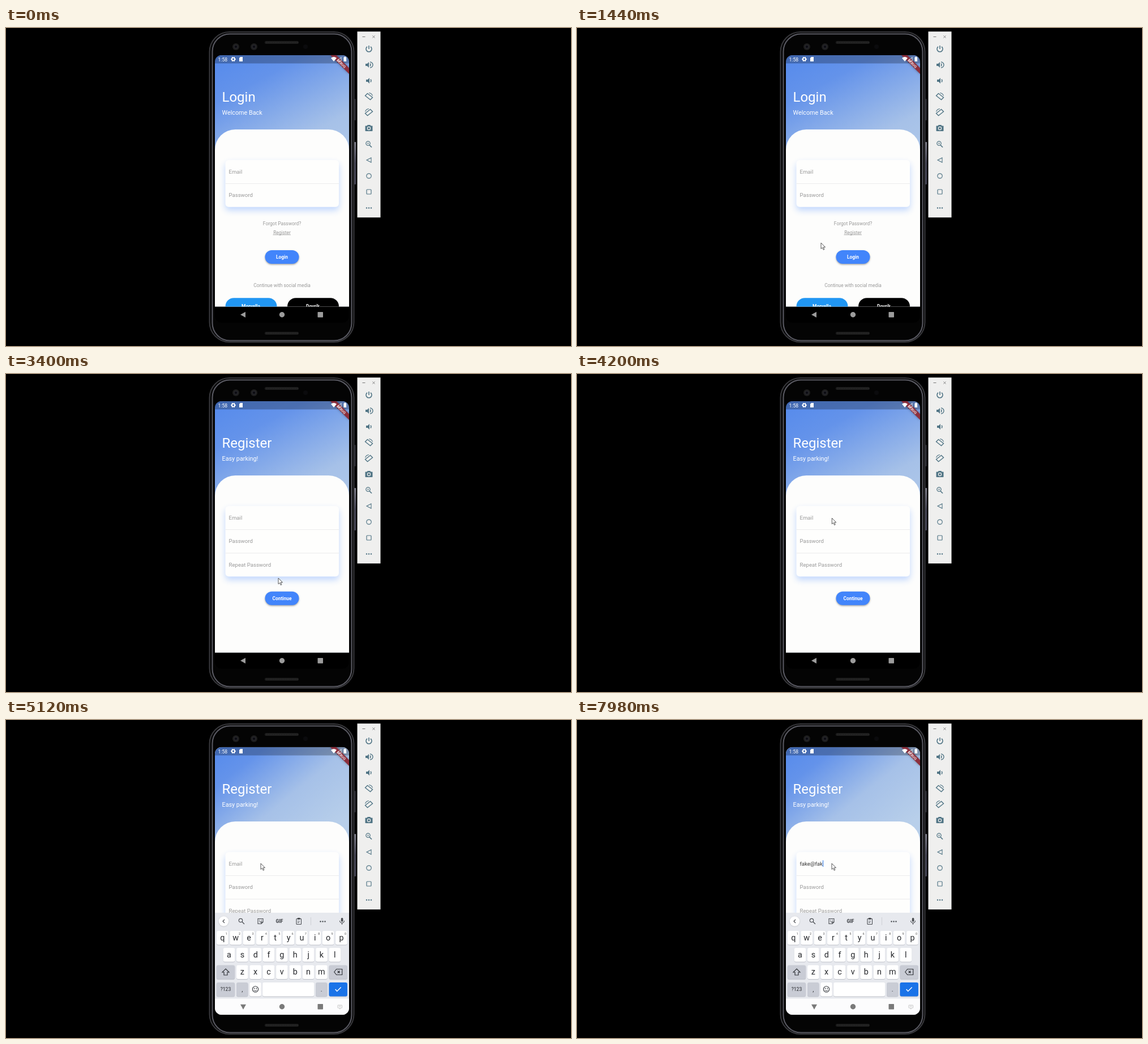
Write an HTML page with a canvas that moves like this. It is 998 by 561 pixels and loops after 8000 ms.

```html
<!DOCTYPE html>
<html>
<head>
<meta charset="utf-8">
<style>
html, body { margin: 0; height: 100%; overflow: hidden; background: #000; }
canvas { display: block; }
</style>
</head>
<body>
<canvas id="stage" width="998" height="561"></canvas>
<script>
const c = document.getElementById('stage').getContext('2d');
const LOOP = 8000, LEFT = 369, TOP = 47.7, WIDTH = 237, MID = 487.5;
const PAGE_END = 491.6, SCREEN_END = 520, KEYBOARD_TOP = 340;

const clamp = v => Math.max(0, Math.min(1, v));
const progress = (t, from, to) => clamp((t - from) / (to - from));
const easeOut = p => 1 - (1 - p) ** 3;
const smooth = p => p * p * (3 - 2 * p);

function box(x, y, w, h, r, fill, stroke, line = 1) {
  c.beginPath();
  c.roundRect(x, y, w, h, r);
  if (fill) { c.fillStyle = fill; c.fill(); }
  if (stroke) { c.strokeStyle = stroke; c.lineWidth = line; c.stroke(); }
}
function dot(x, y, r, fill, stroke, line) {
  box(x - r, y - r, 2 * r, 2 * r, r, fill, stroke, line);
}
function path(d, x, y, color, line) {
  c.save();
  c.translate(x, y);
  const shape = new Path2D(d);
  if (line) { c.strokeStyle = color; c.lineWidth = line; c.stroke(shape); }
  else { c.fillStyle = color; c.fill(shape); }
  c.restore();
}
function text(s, x, y, size, color, align = 'left', weight = 400) {
  c.font = `${weight} ${size}px Roboto, sans-serif`;
  c.textAlign = align;
  c.fillStyle = color;
  c.fillText(s, x, y);
}
function withShadow(color, blur, dy, draw) {
  c.save();
  c.shadowColor = color;
  c.shadowBlur = blur;
  c.shadowOffsetY = dy;
  draw();
  c.restore();
}
function clipped(x, y, w, h, r, draw) {
  c.save();
  c.beginPath();
  c.roundRect(x, y, w, h, r);
  c.clip();
  draw();
  c.restore();
}
const dots = (x, y, gap, color) => [-1, 0, 1].forEach(i => dot(x + i * gap, y, 1.2, color));

function drawPhone() {
  const shine = c.createLinearGradient(0, 201, 0, 276);
  shine.addColorStop(0, '#a9a9b8');
  shine.addColorStop(0.5, '#55556a');
  box(615.5, 125, 2, 38, 1, '#33333b');
  box(615.5, 201, 2.2, 75, 1, shine);
  box(359.5, 7, 255, 547, 35, '#070707', '#38383c', 2);
  box(364.5, 10.5, 246, 541, 31, '#040404', '#5a5a63', 2);
  for (const y of [23, 536]) {
    box(457, y, 60, 5, 2.5, '#1d1d1d');
    for (let x = 460; x < 515; x += 3) box(x, y + 1.5, 1.4, 2, 0, '#2b2b2b');
  }
  for (const x of [406, 438]) {
    dot(x, 33, 6, '#1d1d1d');
    dot(x, 33, 3, '#0d0d12', '#2c2c34');
  }
  dot(529, 33, 4, '#0b0b0d');
}

function drawSidebar() {
  const ink = '#527686', x = 641;
  box(620.5, 6.2, 41, 328, 0, '#efefee');
  path('M-2 0H3', 631.5, 15.5, '#777', 1);
  path('M-2-2L2 2M2-2L-2 2', 649.5, 15.5, '#777', 1);
  path('M0-6V0M-3-4A5 5 0 1 0 3-4', x, 37, ink, 1.6);
  const speaker = 'M-6-2H-3L0-5V5L-3 2H-6Z';
  path(speaker, x, 65, ink);
  path('M2-2.5Q4 0 2 2.5M2-5A5 5 0 0 1 2 5', x, 65, ink, 1.4);
  path(speaker, x + 1, 93, ink);
  path('M3-2.5Q5 0 3 2.5', x, 93, ink, 1.4);
  for (const [y, side] of [[121, 1], [149, -1]]) {
    c.save();
    c.translate(x, y);
    c.scale(side, 1);
    path('M-2.5-5.5L6.5 1.5L2.5 5.5L-6.5-1.5Z', 0, 0, ink, 1.4);
    path('M0-6.5Q5-6 6.5-1.5', 0, 0, ink, 1.1);
    c.restore();
  }
  box(x - 6.5, 172.5, 13, 9.5, 1, ink);
  box(x - 3, 171, 6, 3, 1, ink);
  dot(x, 177, 2.6, ink, '#efefee', 1.2);
  dot(x - 1.5, 203.5, 3.6, null, ink, 1.3);
  path('M1 1.5L5 5.5', x, 205, ink, 1.7);
  path('M-3-1.5H0M-1.5-3V0', x, 205, ink, 0.7);
  path('M4-4V4L-4 0Z', x, 233, ink, 1.1);
  dot(x, 261, 4.2, null, ink, 1.2);
  box(x - 4, 285, 8, 8, 1, null, ink, 1.2);
  dots(x, 317.5, 4, ink);
}

function drawStatus() {
  box(LEFT, TOP, WIDTH, 14.7, 0, 'rgba(0,0,0,.25)');
  withShadow('rgba(0,0,0,.4)', 4, 0, () =>
    path('M572.5 47.5H583L606 70.5V81Z', 0, 0, '#8c2f3d'));
  c.save();
  c.translate(591.8, 63);
  c.rotate(Math.PI / 4);
  text('DEBUG', 0, 1.6, 6.2, '#f4e6e8', 'center', 700);
  c.restore();
  text('1:58', 374.5, 58.5, 8.6, '#fff');
  dot(401.5, 55, 2.6, null, '#fff', 1.9);
  for (let i = 0; i < 6; i++) {
    const a = i * Math.PI / 3;
    dot(401.5 + 3.5 * Math.cos(a), 55 + 3.5 * Math.sin(a), 0.9, '#fff');
  }
  path('M-1-4H3V4H-3V-2Z', 415, 55, '#fff');
  path('M-5-2Q0-6 5-2L0 4Z', 579, 55, '#fff');
  path('M3.5-3.5V3.5H-3.5Z', 588.5, 55, '#fff', 0.8);
  box(596.5, 51.5, 4.6, 7.5, 0.5, '#fff');
  box(597.8, 50.5, 2, 2, 0, '#fff');
}

function drawButton(label, y) {
  withShadow('rgba(0,0,0,.35)', 3, 1.5, () => box(457.5, y, 60, 24, 12, '#4285fb'));
  text(label, MID, y + 15, 8.4, '#fff', 'center', 700);
}

function drawPage(title, subtitle, fields, end, drawBody, email) {
  const sky = c.createLinearGradient(LEFT, TOP, LEFT + WIDTH, end);
  sky.addColorStop(0, '#558aec');
  sky.addColorStop(0.15, '#6493ea');
  sky.addColorStop(0.4, '#a6c1e8');
  sky.addColorStop(0.65, '#b8cfea');
  box(LEFT, TOP, WIDTH, PAGE_END - TOP, 0, sky);
  text(title, 381.5, 130, 24, '#fff');
  text(subtitle, 381.5, 152.5, 10.8, '#fff');
  box(LEFT, 179, WIDTH, 360, [36, 36, 0, 0], '#fdfdfc');
  withShadow('rgba(68,138,255,.32)', 12, 6, () =>
    box(387.5, 233, 200.5, fields.length * 41.4, 6, '#fefefd'));
  fields.forEach((name, i) => {
    const y = 256.5 + i * 41.5;
    if (i) box(387.5, y - 24, 200.5, 1, 0, '#ececec');
    if (i || !email) text(name, 393.5, y, 9.6, '#999');
  });
  drawBody();
}

function drawLogin() {
  drawPage('Login', 'Welcome Back', ['Email', 'Password'], PAGE_END, () => {
    const grey = '#999';
    text('Forgot Password?', MID, 348, 8.4, grey, 'center');
    text('Register', MID, 363.5, 8.4, grey, 'center');
    box(471.5, 364.5, 31.5, 0.8, 0, grey);
    drawButton('Login', 392);
    text('Continue with social media', MID, 456.5, 8.4, grey, 'center');
    box(387.5, 476.2, 91, 30, 15, '#2196f3');
    box(497, 476.2, 91, 30, 15, '#000');
    text('Morvella', 432.5, 494, 8.4, '#fff', 'center', 700);
    text('Dovrik', 542, 494, 8.4, '#fff', 'center', 700);
  });
}

const FOCUS = 4560, EMAIL = 'fake@fak';
const KEY_TIMES = [5740, 5980, 6200, 6520, 7060, 7460, 7660, 7860];

function drawRegister(t, end) {
  const count = KEY_TIMES.filter(k => k <= t).length;
  const typed = EMAIL.slice(0, count);
  drawPage('Register', 'Easy parking!', ['Email', 'Password', 'Repeat Password'], end, () => {
    drawButton('Continue', 383.7);
    text(typed, 393.5, 256.5, 9.6, '#333');
    const width = c.measureText(typed).width;
    if (count && count < 5) box(393.5, 258, width, 0.8, 0, '#333');
    const since = t - (count ? KEY_TIMES[count - 1] : FOCUS);
    if (since >= 0 && since % 1000 < 500) box(393.5 + width, 247.5, 1.2, 11.5, 0, '#4285e8');
  }, typed);
  return count;
}

function drawKey(label, x, y, w = 20.5, fill = '#fff', size = 14.4) {
  box(x - w / 2, y - 11, w, 24.5, 3, '#bfc2ca');
  box(x - w / 2, y - 12, w, 24.5, 3, fill);
  text(label, x, y + size * 0.33, size, '#26282c', 'center');
}

function drawToolbar(count) {
  const y = 355, ink = '#494c51', suggesting = count > 0 && count < 5;
  withShadow('rgba(0,0,0,.2)', 2, 0.5, () => dot(384.5, y, 8.7, '#fff'));
  path(suggesting ? 'M-1.5-3L1.5 0L-1.5 3' : 'M1.5-3L-1.5 0L1.5 3', 384.5, y, ink, 1.2);
  box(591.8, 349, 3.6, 7, 1.8, ink);
  path('M-4-1A4 4 0 0 0 4-1M0 3V6', 593.5, y, ink, 1.1);
  if (suggesting) {
    const words = [['f', 'for', 'from'], ['fa', 'far', 'fast'], ['fak', 'oak', 'fake'], ['fake', 'lake', 'fakes']][count - 1];
    [422, 486.5, 551.5].forEach((x, i) => text(words[i], x, 359, 11, ink, 'center'));
    for (const x of [452.5, 521]) box(x, 348, 1, 14, 0, '#cdd0d6');
    return;
  }
  dot(414.5, 353.5, 3.2, null, ink, 1.2);
  path('M1 1L5 5', 416, y, ink, 1.3);
  path('M-4.5-4.5H4.5V1.5L1.5 4.5H-4.5ZM1.5 4.5V1.5H4.5M-2 0Q0 3 2 0', 449.5, y, ink, 1.1);
  dot(447.7, 353, 0.8, ink);
  dot(451.3, 353, 0.8, ink);
  text('GIF', 483, 358, 8.4, ink, 'center', 900);
  box(513, 350.5, 8.5, 10, 1, null, ink, 1.1);
  box(515, 349, 4.5, 3, 0.5, ink);
  path('M-2 0H2M-2 2.5H1', 517, y, ink, 0.9);
  box(538, 348, 1, 14, 0, '#cdd0d6');
  dots(559.5, 355.5, 4, ink);
}

function drawKeyboard(offset, count) {
  const grey = '#c9ccd5', ink = '#33363b', pitch = 23.35;
  c.save();
  c.translate(0, offset);
  box(LEFT, KEYBOARD_TOP, WIDTH, 152, 0, '#e7e9ee');
  box(LEFT, PAGE_END, WIDTH, 29, 0, '#fcfcfd');
  drawToolbar(count);
  [['qwertyuiop', 382.3, 384], ['asdfghjkl', 394, 414], ['zxcvbnm', 417.3, 444.5]].forEach(([letters, x0, y], row) =>
    [...letters].forEach((letter, i) => {
      const x = x0 + i * pitch;
      drawKey(letter, x, y);
      if (!row) text((i + 1) % 10, x + 7, y - 5, 5.5, '#555', 'center');
    }));
  drawKey('', 388, 444.5, 32.5, grey);
  path('M0-6L6 0H3V5H-3V0H-6Z', 388, 445, ink, 1.2);
  drawKey('', 586.7, 444.5, 32.5, grey);
  path('M-7 0L-3-5H7V5H-3ZM-1-2L3 2M3-2L-1 2', 586.7, 444.5, ink, 1.2);
  drawKey('?123', 388, 475, 32.5, grey, 8.6);
  drawKey(',', 417.3, 475, 20.5, grey, 11);
  drawKey('', 440.5, 475);
  dot(440.5, 475, 5.2, null, ink, 1.1);
  dot(438.6, 473.5, 0.9, ink);
  dot(442.4, 473.5, 0.9, ink);
  path('M-3 1Q0 5 3 1', 440.5, 475, ink, 1);
  drawKey('', 498.7, 475, 91);
  drawKey('.', 557.3, 475, 20.5, grey, 11);
  drawKey('', 586.7, 475, 32.5, '#1a73e8');
  path('M-5 0L-2 3.5L5-3.5', 586.7, 475, '#fff', 1.4);
  box(586, 503, 7.5, 5, 0.5, null, '#bbb', 0.8);
  path('M-2 0H2M-1 4.5H1', 589.7, 505, '#bbb', 0.9);
  c.restore();
}

function drawNav(shown) {
  const color = shown ? `rgba(90,90,90,${0.7 + shown * 0.1})` : '#9c9c9c';
  c.save();
  c.translate(419, 505.8);
  c.rotate(-shown * Math.PI / 2);
  path('M4-5V5L-5 0Z', 0, 0, color);
  c.restore();
  dot(MID, 505.8, 4.7, color);
  box(550.5, 501, 9.5, 9.5, 0.8, color);
}

const MOVES = [[1100, 1360, 431, 379], [1660, 2260, 481, 360], [3600, 4240, 450, 253]];

function drawPointer(t) {
  if (t < MOVES[0][0]) return;
  let x = 372, y = 432;
  for (const [from, to, toX, toY] of MOVES) {
    const p = smooth(progress(t, from, to));
    x += (toX - x) * p;
    y += (toY - y) * p;
  }
  const arrow = 'M0 0V10.5L2.5 8.3L4.2 12.3L5.9 11.6L4.2 7.7H7.5Z';
  path(arrow, x, y, '#fff');
  path(arrow, x, y, '#444', 0.9);
}

function drawScreen(t) {
  const enter = easeOut(progress(t, 2980, 3280));
  const rise = easeOut(progress(t, 4585, 4885));
  const turn = smooth(progress(t, 4600, 4780));
  const end = PAGE_END - (PAGE_END - KEYBOARD_TOP) * clamp(rise * 1.02);
  let count = 0;
  box(LEFT, TOP, WIDTH, SCREEN_END - TOP, 0, rise ? '#f4f5f6' : '#000');
  clipped(LEFT, TOP, WIDTH, end - TOP, 0, () => {
    if (enter < 1) drawLogin();
    if (!enter) return;
    c.globalAlpha = enter;
    c.translate(0, (1 - enter) * 111);
    count = drawRegister(t, end);
  });
  if (rise) drawKeyboard((1 - rise) * (SCREEN_END - KEYBOARD_TOP), count);
  drawNav(turn);
  drawStatus();
}

function frame(now) {
  const t = now % LOOP;
  c.fillStyle = '#000';
  c.fillRect(0, 0, 998, 561);
  drawPhone();
  drawSidebar();
  clipped(LEFT, TOP, WIDTH, SCREEN_END - TOP, 12, () => drawScreen(t));
  drawPointer(t);
  requestAnimationFrame(frame);
}
requestAnimationFrame(frame);
</script>
</body>
</html>
```
